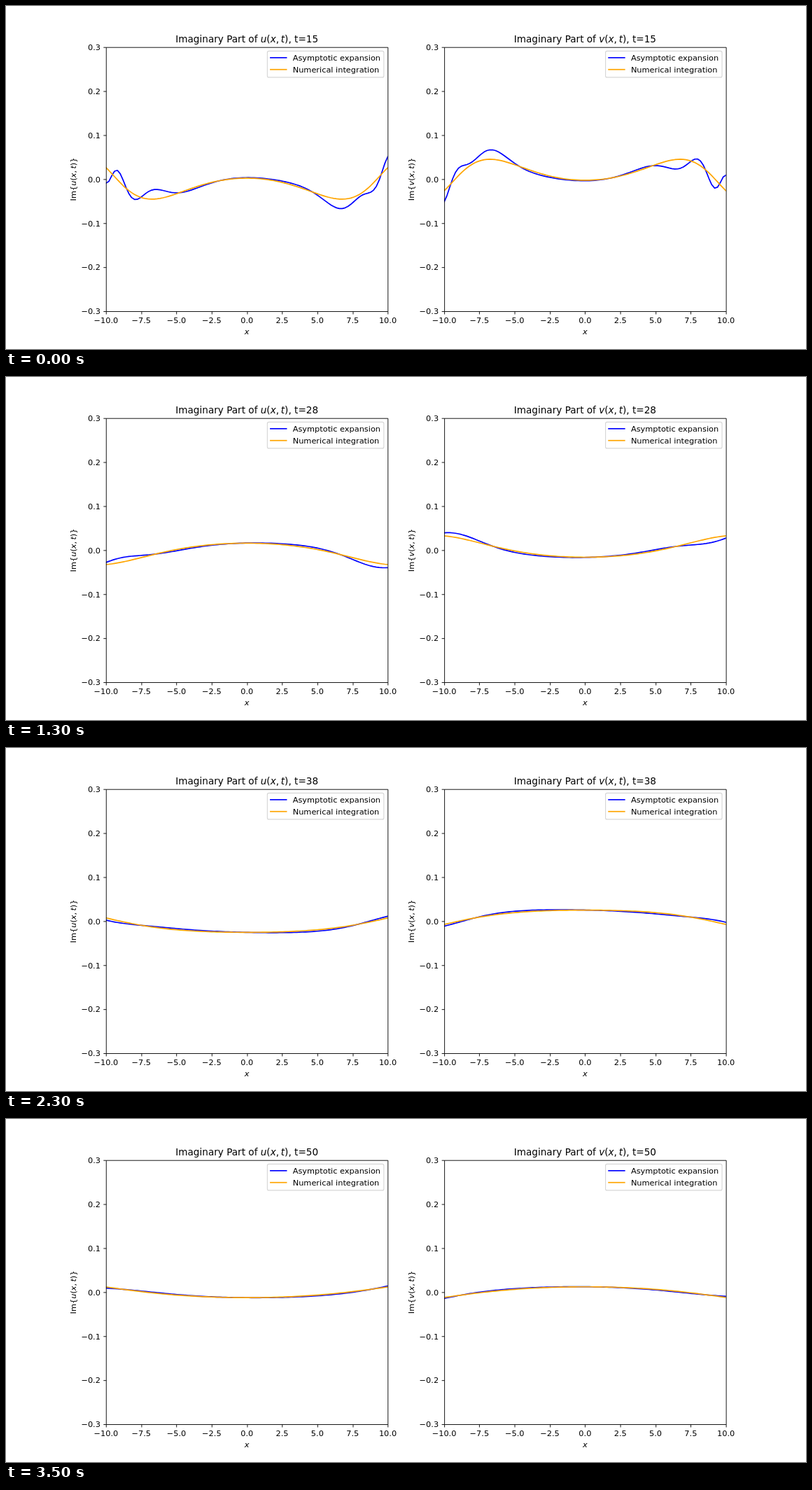
An HTML page that plays this animation: 1143x490 px, repeating every 3600 ms.

```html
<!DOCTYPE html>
<html lang="en">
<head>
<meta charset="utf-8">
<title>Wave components over time</title>
<style>
  html, body { margin: 0; width: 100%; height: 100%; overflow: hidden; background: #fff; }
  svg { display: block; width: 100vw; height: 100vh; }
  text { font-family: "DejaVu Sans", sans-serif; font-size: 13.889px; fill: #000; }
  .title { font-size: 16.667px; }
  .mid { text-anchor: middle; }
  .end { text-anchor: end; }
  .it { font-style: italic; }
  .frame { fill: none; stroke: #000; stroke-width: 1.11; }
  .curve { fill: none; stroke-width: 2.083; stroke-linejoin: round; stroke-linecap: square; }
</style>
</head>
<body>
<svg id="stage" viewBox="0 0 1400 600" preserveAspectRatio="none"></svg>
<script>
const svg = document.getElementById("stage");
const BLUE = "#0000ff", ORANGE = "#ffa500";
const TOP = 72, HEIGHT = 462, WIDTH = 493.18, POINTS = 100;
const STEP_MS = 100, STEPS = 36, FIRST_T = 15;

function add(parent, tag, attrs, text) {
  const el = document.createElementNS("http://www.w3.org/2000/svg", tag);
  for (const name in attrs) el.setAttribute(name, attrs[name]);
  if (text !== undefined) el.textContent = text;
  parent.appendChild(el);
  return el;
}

const label = (value) => value.toFixed(1).replace("-", "\u2212");
const snap = (v) => Math.floor(v + 0.5) + 0.5;
const yPos = (value) => TOP + HEIGHT * (0.3 - value) / 0.6;

// Appends "u(x, t)" with italic variables.
function addFormula(text, name) {
  const italic = { class: "it" };
  add(text, "tspan", italic, name);
  add(text, "tspan", {}, "(");
  add(text, "tspan", italic, "x");
  add(text, "tspan", {}, ",");
  add(text, "tspan", { class: "it", dx: "0.2em" }, "t");
  add(text, "tspan", {}, ")");
}

function addLegend(left) {
  const box = left + WIDTH - 6.94 - 203.9;
  add(svg, "rect", {
    x: box, y: 78.9, width: 203.9, height: 45.9, rx: 2.8,
    fill: "#fff", "fill-opacity": 0.8, stroke: "#ccc", "stroke-opacity": 0.8, "stroke-width": 1.39
  });
  [["Asymptotic expansion", BLUE], ["Numerical integration", ORANGE]].forEach(([name, color], i) => {
    const y = 90.4 + i * 20.7;
    add(svg, "path", { class: "curve", stroke: color, d: `M${box + 5.56} ${y}h27.78` });
    add(svg, "text", { x: box + 44.5, y: y + 4.8 }, name);
  });
}

function makePanel(left, name) {
  const xPos = (x) => left + WIDTH * (x + 10) / 20;
  const middle = xPos(0);
  const x0 = snap(left), x1 = snap(left + WIDTH);
  const y0 = snap(TOP), y1 = snap(TOP + HEIGHT);

  const clip = add(svg, "clipPath", { id: "clip-" + name });
  add(clip, "rect", { x: left, y: TOP, width: WIDTH, height: HEIGHT });
  const plot = add(svg, "g", { "clip-path": `url(#clip-${name})` });
  const curve = (stroke) => add(plot, "path", { class: "curve", stroke });
  const expansion = curve(BLUE), integral = curve(ORANGE);

  let ticks = "";
  for (let x = -10; x <= 10; x += 2.5) {
    ticks += `M${snap(xPos(x))} ${y1}v4.86`;
    add(svg, "text", { class: "mid", x: xPos(x), y: 555 }, label(x));
  }
  for (let i = -3; i <= 3; i++) {
    const y = yPos(i / 10);
    ticks += `M${x0} ${snap(y)}h-4.86`;
    add(svg, "text", { class: "end", x: left - 9.72, y: y + 5.2 }, label(i / 10));
  }
  add(svg, "path", { class: "frame", d: ticks + `M${x0} ${y0}H${x1}V${y1}H${x0}Z` });

  add(svg, "text", { class: "mid it", x: middle, y: 573.7 }, "x");
  const side = add(svg, "text", { class: "mid", transform: `translate(${left - 52.7} 303) rotate(-90)` });
  add(side, "tspan", {}, "Im{");
  addFormula(side, name);
  add(side, "tspan", {}, "}");

  const title = add(svg, "text", { class: "title mid", x: middle, y: 63.7 });
  add(title, "tspan", {}, "Imaginary Part of ");
  addFormula(title, name);
  const time = add(title, "tspan", {}, "");
  addLegend(left);

  const path = (values) => "M" + values.map((v, i) =>
    (left + WIDTH * i / (POINTS - 1)).toFixed(2) + " " + yPos(v).toFixed(2)).join("L");

  return (t, blue, orange) => {
    time.textContent = ", t=" + t;
    expansion.setAttribute("d", path(blue));
    integral.setAttribute("d", path(orange));
  };
}

// Fourier transform of exp(-x^2) / 4
const spectrum = (k) => Math.sqrt(Math.PI) / 4 * Math.exp(-k * k / 4);

// Im u by trapezoidal quadrature over wavenumber
function quadrature(x, t) {
  const dk = 0.05;
  let sum = 0;
  for (let i = 0; i < 150; i++) {
    const k = i * dk, w = Math.hypot(1, k);
    sum += (i ? 1 : 0.5) * spectrum(k) * Math.sin(w * t) / w * Math.cos(k * x);
  }
  return -sum * dk / Math.PI;
}

// Im u from the two frequency branches at k = x / sqrt(t^2 - x^2)
function stationaryPhase(x, t) {
  const s = Math.sqrt(t * t - x * x), k = x / s, w = t / s;
  const size = spectrum(k) * w ** 1.5 / Math.sqrt(2 * Math.PI * t);
  const ratio = (k + 1) / w, shift = Math.PI / 4;
  return size / 2 * ((1 - ratio) * Math.sin(w * t + k * x + shift)
                   - (1 + ratio) * Math.sin(w * t - k * x + shift));
}

const xs = Array.from({ length: POINTS }, (_, i) => -10 + 20 * i / (POINTS - 1));
const drawU = makePanel(175, "u");
const drawV = makePanel(766.82, "v");
const mirror = (values) => values.map((v) => -v).reverse();

let shown = -1;
function update(ms) {
  const step = Math.floor(ms / STEP_MS) % STEPS;
  if (step === shown) return;
  shown = step;
  const t = FIRST_T + step;
  const blue = xs.map((x) => stationaryPhase(x, t));
  const orange = xs.map((x) => quadrature(x, t));
  drawU(t, blue, orange);
  drawV(t, mirror(blue), mirror(orange));
}

const start = performance.now();
function tick() {
  update(performance.now() - start);
  requestAnimationFrame(tick);
}
tick();
</script>
</body>
</html>
```
